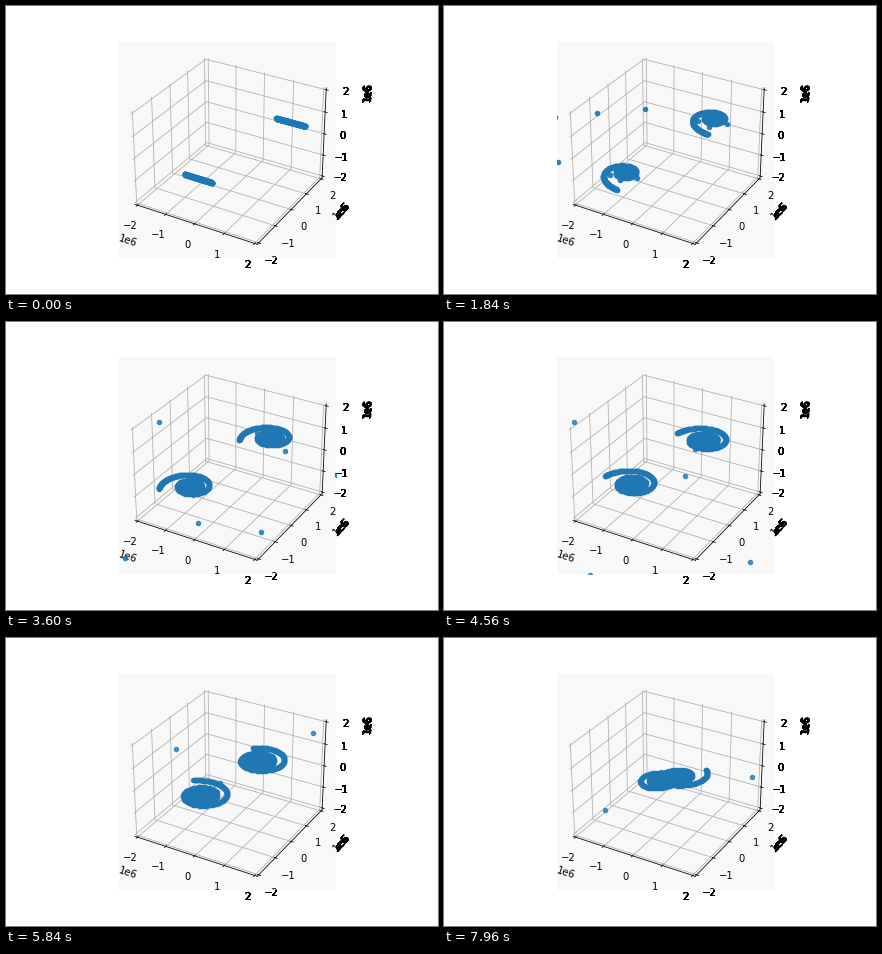
A matplotlib script for the animation above (8 s loop, 432 by 288 pixels).

```python
import numpy as np
import matplotlib.pyplot as plt
from matplotlib.animation import FuncAnimation
from mpl_toolkits.mplot3d import proj3d

W, H, DPI = 432, 288, 72
FRAMES, STEP = 200, 40
UNIT = 1e6

# Lengths in UNIT, time in seconds
GM = 0.4
DT = STEP / 1000
STARS = 300
REACH = 0.97
FAR = 8

plt.rcParams.update({"font.family": "DejaVu Sans", "font.size": 10,
                     "figure.subplot.bottom": 0.125})


def pull(points, mass):
    """Gravity of one point mass on many points."""
    gap = mass - points
    dist = np.linalg.norm(gap, axis=1, keepdims=True)
    return GM * gap / np.maximum(dist, 1e-4) ** 3


def simulate():
    """Two cores fall together, each with a row of stars on circular orbits."""
    cores = np.array([[-1.0, -1, -1], [1, 1, 1]])
    core_v = np.zeros_like(cores)
    r = np.linspace(REACH / STARS, REACH, STARS)
    row = np.column_stack([r, 0 * r, 0 * r])
    spin = np.column_stack([0 * r, -np.sqrt(GM / r), 0 * r])
    stars = np.vstack([core + row for core in cores])
    star_v = np.vstack([spin, spin])

    history = []
    for _ in range(FRAMES):
        history.append(stars.copy())
        star_v += DT * (pull(stars, cores[0]) + pull(stars, cores[1]))
        core_v += DT * np.vstack([pull(cores[:1], cores[1]),
                                  pull(cores[1:], cores[0])])
        stars += DT * star_v
        cores += DT * core_v
    return history


fig = plt.figure(figsize=(W / DPI, H / DPI), dpi=DPI, facecolor="white")
ax = fig.add_subplot(projection="3d", facecolor="#f8f8f8")
edge = 2 * UNIT * 25 / 24
ax.set(xlim=(-edge, edge), ylim=(-edge, edge), zlim=(-edge, edge))
for axis in (ax.xaxis, ax.yaxis, ax.zaxis):
    axis.set_ticks(np.arange(-2, 3) * UNIT)
    axis.set_pane_color((1, 1, 1, 0))
fig.canvas.draw()
box = ax.bbox


def thicken(label, shifts=(0,), copies=12):
    """Stack copies under the axes so only parts outside its patch look heavy."""
    area = label.get_window_extent()
    if area.x1 < box.x1 and area.y0 > box.y0:
        return
    x, y = label.get_transform().transform(label.get_position())
    for shift in shifts:
        for _ in range(copies // len(shifts)):
            fig.text((x + shift) / W, (y + shift) / H, label.get_text(),
                     zorder=-1, ha=label.get_ha(), va=label.get_va(),
                     rotation=label.get_rotation(),
                     rotation_mode=label.get_rotation_mode(),
                     fontsize=label.get_fontsize())


for axis in (ax.xaxis, ax.yaxis, ax.zaxis):
    for tick in axis.get_major_ticks():
        thicken(tick.label1)
    thicken(axis.get_offset_text(), shifts=(0, 1))

# Flat layer over the cube, in canvas pixels
layer = fig.add_axes(ax.get_position(), zorder=5)
layer.set(xlim=(box.x0, box.x1), ylim=(box.y0, box.y1))
layer.axis("off")
dots = layer.scatter([], [], s=20, c="#1f77b4")

proj = ax.get_proj()
history = simulate()


def update(n):
    near = history[n][np.abs(history[n]).max(axis=1) < FAR]
    x, y, _ = proj3d.proj_transform(*(near.T * UNIT), proj)
    dots.set_offsets(ax.transData.transform(np.column_stack([x, y])))
    dots.set_alpha(1 - 0.2 * min(1, n * DT / 5))
    return dots,


anim = FuncAnimation(fig, update, frames=FRAMES, interval=STEP,
                     repeat=True, repeat_delay=0, blit=False)
plt.show()
```
